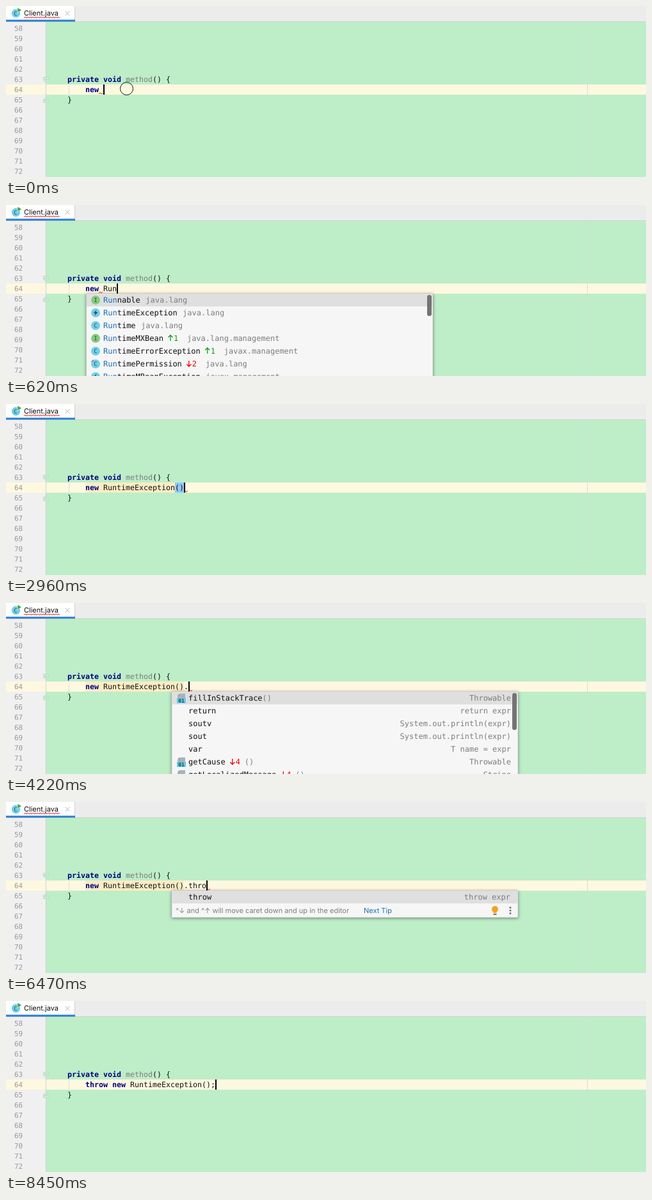
Animation of 1000 by 268 pixels, one loop 8.9 s. Source, as an HTML page:

```html
<!DOCTYPE html>
<html lang="en">
<head>
<meta charset="utf-8">
<title>Postfix completion</title>
<style>
html, body { margin: 0; width: 100%; height: 100%; overflow: hidden; background: #bdeec8; }
svg { display: block; width: 1000px; height: 268px; }
text { white-space: pre; text-rendering: geometricPrecision; fill: #111; }
.code { font: 11.63px "DejaVu Sans Mono", monospace; }
.num { font: 11px "DejaVu Sans Mono", monospace; fill: #999; }
.item { font: 12px "DejaVu Sans Mono", monospace; }
.ui { font: 11px Inter, sans-serif; }
.icon { font: 9px "DejaVu Sans Mono", monospace; fill: #2f4750; text-anchor: middle; }
.kw { font-weight: bold; fill: #000080; }
.gray { fill: #7d7d7d; }
.match { fill: #1d6fb8; }
.up { fill: #109a10; }
.down { fill: #f00000; }
.end { text-anchor: end; }
.wave { fill: none; stroke: #f0201c; stroke-width: 1; }
.popup { filter: drop-shadow(0 1px 2.5px rgba(0, 0, 0, .45)); }
</style>
</head>
<body>
<svg id="stage" viewBox="0 0 1000 268" xmlns="http://www.w3.org/2000/svg">
  <g id="base"></g><g id="live"></g>
</svg>
<script>
const LOOP = 8900;
const CODE_X = 124, COL = 7, ITEM_COL = 7.224;
const CALL = 'new RuntimeException()';
const FINAL = 'throw new RuntimeException();';

const rect = (x, y, w, h, fill, extra = '') =>
  `<rect x="${x}" y="${y}" width="${w}" height="${h}" fill="${fill}" ${extra}/>`;
const text = (cls, x, y, body) => `<text class="${cls}" x="${x}" y="${y}">${body}</text>`;
const span = (cls, body) => `<tspan class="${cls}">${body}</tspan>`;
const path = (d, fill, extra = '') => `<path d="${d}" fill="${fill}" ${extra}/>`;
const circle = (x, y, r, fill) => `<circle cx="${x}" cy="${y}" r="${r}" fill="${fill}"/>`;
const keywords = s => s.replace(/\b(private|void|throw|new)\b/g, k => span('kw', k));

function wave(x, y, width) {
  let d = `M${x} ${y + 2}`;
  for (let i = 2; i <= width; i += 2) d += `L${x + i} ${y + (i % 4 ? 0 : 2)}`;
  return `<path class="wave" d="${d}"/>`;
}

function typeIcon(kind, x, y) {
  const disc = circle(x, y, 7, kind === 'I' ? '#84cd7d' : '#70d0ea');
  if (kind === 'E') {
    return disc + path(`M${x + 1.5} ${y - 4.5}l-5 5h3l-1 4l5-5.5h-3z`, '#2f4750');
  }
  const mark = kind === 'P' ? path(`M${x - 8} ${y - 3}l4-4l1 3z`, '#8a9199') : '';
  return disc + text('icon', x, y + 3.3, kind === 'P' ? 'C' : kind) + mark;
}

function methodIcon(x, y) {
  return path(`M${x + 5} ${y - 7}h8v7h-12v-3z`, '#a8b2b9') +
    path(`M${x + 1} ${y - 4}l3-3v3z`, '#8f9aa2') +
    rect(x, y, 14, 8, '#63cbe7') +
    `<text class="icon" x="${x + 7}" y="${y + 7}" style="font-size:8px;font-weight:bold">01</text>`;
}

function bulb(x, y, lit) {
  return circle(x, y - 2, 5, lit ? '#f4a51c' : '#b9b9b9') +
    rect(x - 2.5, y + 2, 5, 2, lit ? '#f4a51c' : '#b9b9b9') + rect(x - 2.5, y + 5, 5, 2, '#757575');
}

function panel(x, width, height, selected, body) {
  return `<g class="popup">${rect(x, 139, width, height, '#f6f6f6', 'stroke="#bdbdbd" stroke-width=".6"')}</g>` +
    rect(x + .5, 139 + selected * 20, width - 1, 20, '#dfdfdf') + body;
}

const scrollbar = (x, height) => rect(x, 141, 7, height, '#747474', 'rx="3.5"');

function badge(x, y, mark) {
  if (!mark) return '';
  const up = mark[0] === 'u';
  const d = up ? `M${x + 4} ${y}v-9m-3.5 3.5l3.5-3.5l3.5 3.5` : `M${x + 4} ${y - 9}v9m-3.5-3.5l3.5 3.5l3.5-3.5`;
  return path(d, 'none', `stroke="${up ? '#109a10' : '#f00000'}" stroke-width="1.3"`) +
    text(up ? 'item up' : 'item down', x + 9, y, mark[1]);
}

const CLASSES = [
  ['I', 'nable', '', 'java.lang'],
  ['E', 'timeException', '', 'java.lang'],
  ['C', 'time', '', 'java.lang'],
  ['I', 'timeMXBean', 'u1', 'java.lang.management'],
  ['C', 'timeErrorException', 'u1', 'javax.management'],
  ['P', 'timePermission', 'd2', 'java.lang'],
  ['E', 'timeMBeanException', '', 'javax.management'],
];

const MEMBERS = [
  ['fillInStackTrace', '', '()', 'Throwable'],
  ['return', '', '', 'return expr'],
  ['soutv', '', '', 'System.out.println(expr)'],
  ['sout', '', '', 'System.out.println(expr)'],
  ['var', '', '', 'T name = expr'],
  ['getCause', 'd4', '()', 'Throwable'],
  ['getLocalizedMessage', 'd4', '()', 'String'],
];

const popups = {
  classes: s => panel(125.5, 541.5, 140, s.selected, CLASSES.map(([kind, rest, mark, pkg], i) => {
    const y = 153 + i * 20, end = 152 + (rest.length + 3) * ITEM_COL;
    return typeIcon(kind, 140, y - 4) +
      text('item', 152, y, span('match', 'Run') + rest) +
      badge(end + 7, y, mark) +
      text('item gray', end + (mark ? 37 : 8.5), y, pkg);
  }).join('') + scrollbar(658, 33)),

  members: () => panel(259, 541, 140, 0, MEMBERS.map(([name, mark, args, type], i) => {
    const y = 153 + i * 20, end = 285 + name.length * ITEM_COL;
    return (args ? methodIcon(267, y - 4) : '') +
      text('item', 285, y, name) +
      badge(end + 7, y, mark) +
      text('item gray', end + (mark ? 30 : 0), y, args) +
      text('item gray end', 789, y, type);
  }).join('') + scrollbar(791, 58)),

  postfix: s => panel(259, 541, 42, 0,
    text('item', 285, 153, 'throw') +
    text('item gray end', 788, 153, 'throw expr') +
    text('ui gray', 265, 174, '^↓ and ^↑ will move caret down and up in the editor') +
    text('ui match', 559, 174, 'Next Tip') +
    bulb(764, 170, s.lit) +
    [165.5, 170, 174.5].map(y => circle(788, y, 1.5, '#6e6e6e')).join('')),
};

// Each step overrides only what changes from the one before.
const STEPS = [
  { at: 0, code: 'new ', caret: 1, ring: 1, error: 145, tabError: 1, popup: '', selected: 0, mark: 0, parens: 0, bulb: 0, lit: 0 },
  { at: 90, ring: .4 },
  { at: 180, ring: 0, caret: 0 },
  { at: 360, code: 'new R', caret: 1 },
  { at: 450, code: 'new Ru' },
  { at: 540, code: 'new Run', popup: 'classes' },
  { at: 1430, selected: 1 },
  { at: 1520, caret: 0 },
  { at: 1790, popup: '' },
  { at: 1880, code: CALL, caret: 1 },
  { at: 2150, error: 278, mark: 1, parens: 1 },
  { at: 2240, caret: 0 },
  { at: 2780, bulb: 1 },
  { at: 2960, bulb: 0, caret: 1 },
  { at: 3770, bulb: 1 },
  { at: 3950, caret: 0 },
  { at: 4130, code: CALL + '.', caret: 1, error: 285, parens: 0, bulb: 0 },
  { at: 4220, popup: 'members' },
  { at: 4490, code: CALL + '.t', error: 292 },
  { at: 4580, code: CALL + '.th', error: 299 },
  { at: 4670, popup: 'postfix' },
  { at: 4850, code: CALL + '.thr', error: 306 },
  { at: 4940, code: CALL + '.thro', error: 313 },
  { at: 5480, lit: 1 },
  { at: 6020, caret: 0 },
  { at: 6470, caret: 1 },
  { at: 7010, code: FINAL, popup: '', mark: 0, error: 326 },
  { at: 7370, error: 0 },
  { at: 7550, tabError: 0 },
  { at: 8000, caret: 0 },
  { at: 8450, caret: 1 },
];
const states = [];
STEPS.forEach((step, i) => states.push({ ...states[i - 1], ...step }));

function drawBase() {
  let out = rect(0, 0, 1000, 268, '#bdeec8') + rect(0, 25, 62, 243, '#f0f0f0') +
    rect(0, 123, 1000, 16, '#fef8e0') +
    rect(62, 25, 1, 243, '#cbd3cd') + rect(908, 25, 1, 243, '#d4ddd6') +
    rect(98, 123, 1, 16, '#dfe3d2') +
    rect(0, 0, 1000, 24, '#ececec') + rect(0, 24, 1000, 1, '#d0d0d0') +
    rect(0, 0, 107, 24, '#fff') + rect(107, 0, 1, 24, '#d0d0d0') +
    rect(0, 21.5, 108, 3, '#2b7fd0');
  out += circle(15.5, 11.5, 6.7, '#70d0ea') + text('icon', 15, 14.8, 'C') +
    path('M18 2.5l6.5 4l-6.5 4z', '#3fa53f', 'stroke="#fff" stroke-width=".6"') +
    text('ui', 28, 15, 'Client.java') +
    path('M92.5 8l7 7m0-7l-7 7', 'none', 'stroke="#b4b4b4"');
  for (let n = 58; n <= 72; n++) out += text('num', 13, 39 + (n - 58) * 16, n);
  const fold = 'fill="#c9ead0" stroke="#b5dcbf" stroke-width=".8"';
  out += `<path d="M58.5 111.5h8v5l-4 3.5l-4-3.5z" ${fold}/><path d="M58.5 151.5h8v-5l-4-3.5l-4 3.5z" ${fold}/>` +
    path('M60.5 115.5h4m-4 32h4', 'none', 'stroke="#a5cbae" stroke-width=".8"');
  out += text('code', 96, 119, keywords('private void ') + span('gray', 'method') + '() {') +
    text('code', 96, 151, '}');
  document.getElementById('base').innerHTML = out;
}

function drawState(s) {
  let out = s.tabError ? wave(28, 17, 56) : '';
  if (s.mark) out += rect(124, 123, 154, 16, '#fbecc4');
  if (s.parens) out += rect(264, 123, 14, 16, '#93c9fb');
  if (s.bulb) out += bulb(82, 128, true);
  out += text('code', CODE_X, 135, keywords(s.code));
  if (s.error) out += wave(s.error, 136, 6);
  if (s.caret) out += rect(CODE_X + s.code.length * COL, 123, 2, 16, '#000');
  if (s.ring) out += `<circle cx="188.5" cy="129.5" r="10" fill="none" stroke="#111" opacity="${s.ring}"/>`;
  if (s.popup) out += popups[s.popup](s);
  document.getElementById('live').innerHTML = out;
}

let shown;
function render(now) {
  const t = now % LOOP;
  const state = states.findLast(s => s.at <= t);
  if (state !== shown) drawState(shown = state);
}

drawBase();
render(0);
const start = performance.now();
requestAnimationFrame(function tick() {
  render(performance.now() - start);
  requestAnimationFrame(tick);
});
</script>
</body>
</html>
```
